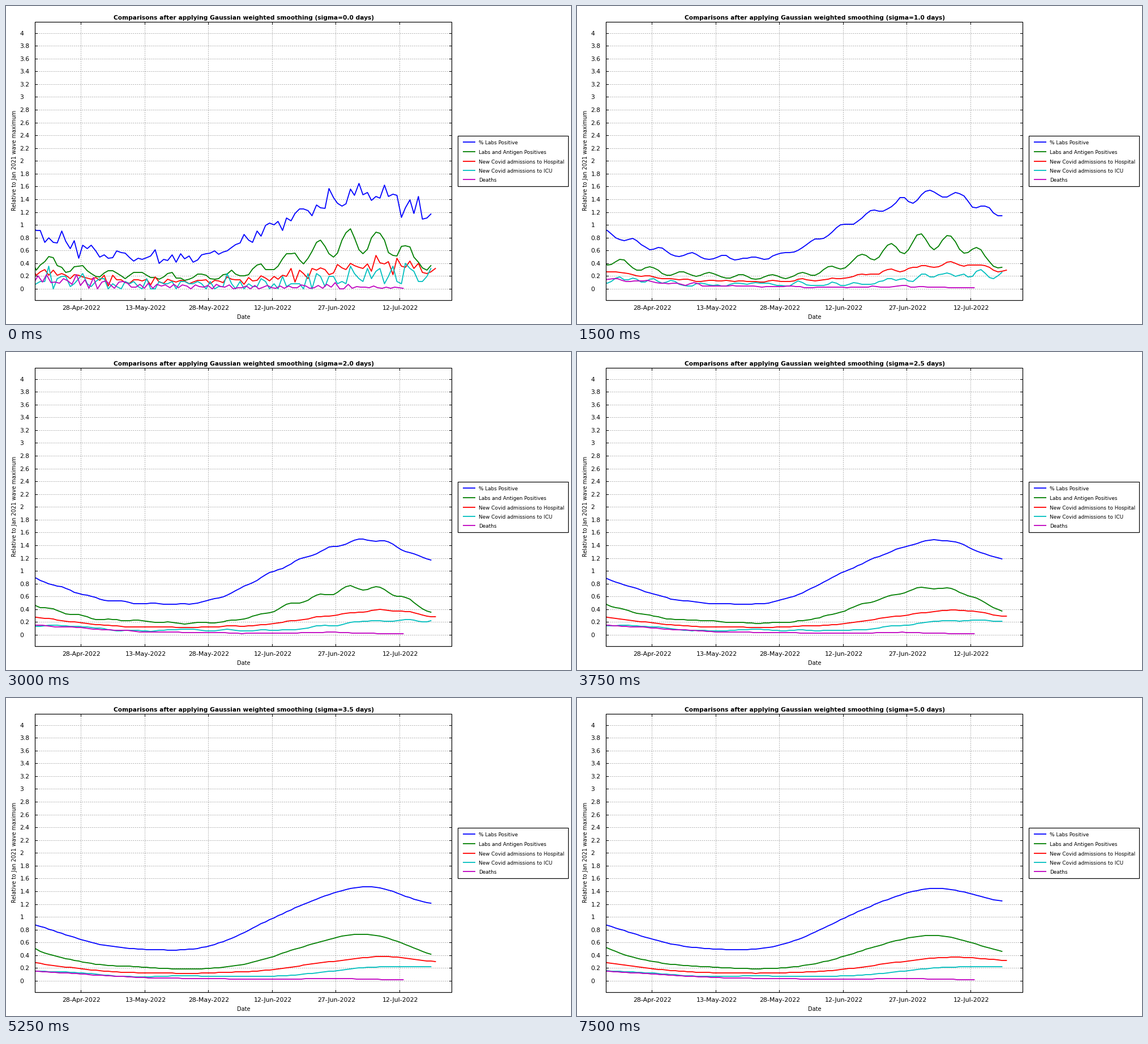
A matplotlib script that plays this animation: 998 by 561 pixels, repeating every 8000 ms.

```python
import numpy as np
import matplotlib.pyplot as plt
from matplotlib.animation import FuncAnimation
from matplotlib.patches import Rectangle

W, H, DPI = 998, 561, 64
PT = 72 / DPI                       # points per pixel
LEFT, RIGHT, TOP, BOTTOM = 51.5, 787.5, 27.5, 518.5
ZERO_Y, UNIT = 499.0, 112.87        # pixel row of value 0, pixels per 1.0
DAY = 7.5                           # pixels per day
PAST = 15                           # days of lead-in left of the plot
KNOT = 7.5                          # days between the key points of a trend

plt.rcParams["font.family"] = "DejaVu Sans"

# Trends are key points in hundredths of the January 2021 maximum.
# "peak" is the weekday offset of the highest reading.
SERIES = [
    dict(label="% Labs Positive", color="#0000ff", row=240, last=93,
         weekly=0.05, peak=6, spread=0.045, unit=0.01,
         trend=[108, 100, 89, 70, 55.5, 50, 48, 47.5, 62, 87, 112.5, 131, 149,
                147.5, 122, 90]),
    dict(label="Labs and Antigen Positives", color="#007f00", row=257, last=93,
         weekly=0.25, peak=3.5, spread=0.025, unit=0.005,
         trend=[110, 82, 44, 34, 23.5, 23, 19, 18, 20.5, 30, 48, 62, 76, 71,
                47, 12]),
    dict(label="New Covid admissions to Hospital", color="#ff0000", row=274,
         last=94, weekly=0.1, peak=3.5, spread=0.06, unit=0.005,
         trend=[45, 38, 27.5, 21.5, 15, 12.5, 12.5, 11, 14, 14, 22, 28, 35,
                40.5, 32.5, 25]),
    dict(label="New Covid admissions to ICU", color="#00bfbf", row=290,
         last=93, weekly=0.2, peak=3, spread=0.17, unit=0.0395,
         trend=[20, 19, 15.5, 14, 10, 5.5, 7, 8, 7, 6.5, 8, 14.5, 19.5, 21.5,
                24, 13]),
    dict(label="Deaths", color="#bf00bf", row=306, last=86.5,
         weekly=0, peak=0, spread=0.1, unit=0.005,
         trend=[20, 18, 15, 12, 9, 5.5, 4, 4, 3, 2, 3, 4, 3, 2, 0.5, 0]),
]


def readings(s, seed):
    """Daily values: trend, weekly cycle and day-to-day reporting noise."""
    days = np.arange(s["last"] % 1 - PAST, s["last"] + 0.1)
    knots = KNOT * np.arange(len(s["trend"])) - PAST
    cycle = 1 + s["weekly"] * np.cos(2 * np.pi * (days - s["peak"]) / 7)
    expected = np.interp(days, knots, s["trend"]) / 100 * cycle
    noise = np.random.RandomState(seed).normal(size=len(days))
    noise *= s["spread"] * np.sqrt(expected)
    values, carry = [], 0           # what one day misses, the next reports
    for level, extra in zip(expected, noise):
        due = level + carry
        value = max(0, round((due + extra) / s["unit"])) * s["unit"]
        values.append(value)
        carry = due - value
    return days, np.array(values)


def smooth(values, sigma):
    if sigma == 0:
        return values
    day = np.arange(len(values))
    kernel = np.exp(-0.5 * ((day[:, None] - day) / sigma) ** 2)
    return kernel @ values / kernel.sum(axis=1)


def to_row(values):
    return np.round(ZERO_Y - UNIT * values)


fig = plt.figure(figsize=(W / DPI, H / DPI), dpi=DPI, facecolor="white")
ax = fig.add_axes([0, 0, 1, 1])
ax.set(xlim=(0, W), ylim=(H, 0))
ax.axis("off")


def line(x, y, color="black", width=1.0, **kw):
    return ax.plot(x, y, color=color, lw=width * PT, **kw)[0]


def text(x, y, s, px, **kw):
    return ax.text(x, y, s, fontsize=px * PT, **kw)


def box(x0, y0, x1, y1):
    ax.add_patch(Rectangle((x0, y0), x1 - x0, y1 - y0, fill=False, ec="black",
                           lw=1.2 * PT, zorder=4))


grid = dict(color="#a0a0a0", width=0.9, dashes=(2, 2), zorder=1)
TICK = 4

for k in range(21):
    y = to_row(k * 0.2) - 0.5
    line([LEFT, RIGHT], [y, y], **grid)
    line([LEFT, LEFT + TICK], [y, y], zorder=4)
    line([RIGHT - TICK, RIGHT], [y, y], zorder=4)
    text(24.5, y + 4.5, f"{k / 5:g}", 10.7)

dates = ["28-Apr", "13-May", "28-May", "12-Jun", "27-Jun", "12-Jul"]
for k, date in enumerate(dates):
    x = np.floor(132.5 + 15 * DAY * k) + 0.5
    line([x, x], [TOP, BOTTOM], **grid)
    line([x, x], [TOP, TOP + TICK], zorder=4)
    line([x, x], [BOTTOM - TICK, BOTTOM], zorder=4)
    text(x + 1, 535.5, date + "-2022", 11, ha="center")

box(LEFT, TOP, RIGHT, BOTTOM)
box(798.5, 228.5, 993.5, 317.5)
text(420, 552.5, "Date", 9.7, ha="center")
text(20, 272, "Relative to Jan 2021 wave maximum", 9.6, rotation=90,
     ha="right", va="center")
title = text(419.7, 24, "", 10.67, ha="center", weight="bold")

window = Rectangle((LEFT, TOP), RIGHT - LEFT, BOTTOM - TOP,
                   transform=ax.transData)
curves = []
for seed, s in enumerate(SERIES):
    days, values = readings(s, seed)
    x = np.floor(53 + DAY * days) + 0.5
    curve = line(x, to_row(values), s["color"], 1.8, zorder=3)
    curve.set_clip_path(window)
    curves.append((curve, values))
    row = s["row"]
    line([807, 829], [row, row], s["color"], 1.8, solid_capstyle="butt")
    text(835.5, row + 4.3, s["label"], 8.86)


def draw(frame):
    sigma = frame // 3 * 0.5        # one step every 750 ms
    title.set_text("Comparisons after applying Gaussian weighted smoothing "
                   f"(sigma={sigma:.1f} days)")
    for curve, values in curves:
        curve.set_ydata(to_row(smooth(values, sigma)))
    return [title] + [curve for curve, _ in curves]


anim = FuncAnimation(fig, draw, frames=32, interval=250, repeat=True,
                     repeat_delay=0, blit=False)
plt.show()
```
